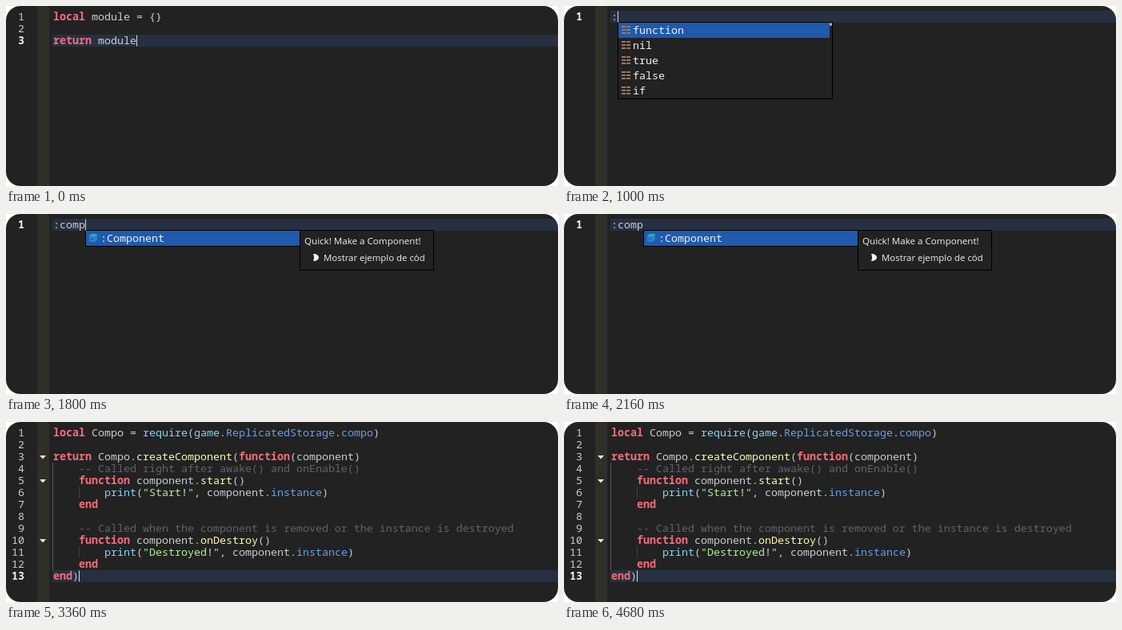
Animation of 690 by 226 pixels, one loop 4.76 s. Source, as an HTML page:

```html
<!DOCTYPE html>
<html lang="en">
<head>
<meta charset="utf-8">
<title>Code snippet</title>
<style>
  html, body { margin: 0; width: 100%; height: 100%; overflow: hidden; background: #fff; }
  svg { display: block; width: 690px; height: 226px; }
  text { white-space: pre; }
  .mono { font: 13.333px "Noto Sans Mono", "DejaVu Sans Mono", monospace; }
  .sans { font-family: "Open Sans", "Noto Sans", sans-serif; fill: #f2f2f2; }
  .bold { font-weight: 700; }
</style>
</head>
<body>
<svg id="stage" viewBox="0 0 690 226" xmlns="http://www.w3.org/2000/svg"></svg>
<script>
const LOOP = 4760, BLINK = 560, LEFT = 59, CHAR = 8, LINE = 15;
const NS = "http://www.w3.org/2000/svg";
const stage = document.getElementById("stage");

function add(parent, tag, attrs, content) {
  const node = document.createElementNS(NS, tag);
  for (const key in attrs) node.setAttribute(key, attrs[key]);
  if (content !== undefined) node.textContent = content;
  parent.appendChild(node);
  return node;
}
const rect = (g, x, y, width, height, fill, more) =>
  add(g, "rect", { x, y, width, height, fill, ...more });
const path = (g, d, fill) => add(g, "path", { d, fill });
const mono = (g, x, y, str, fill, bold) =>
  add(g, "text", { x, y, fill, class: bold ? "mono bold" : "mono" }, str);
const sans = (g, x, y, str, size, more) =>
  add(g, "text", { x, y, class: "sans", "font-size": size, ...more }, str);
const lineTop = n => 6 + (n - 1) * LINE;

// Syntax colours
const KEYWORDS = /^(local|return|function|end)$/;
const BUILTINS = /^(require|game|print)$/;
const TOKEN = /--.*|"[^"]*"|[A-Za-z_]\w*|[^\sA-Za-z"]/g;

function colourOf(word, before, after) {
  if (word.startsWith("--")) return "#636363";
  if (word[0] === '"') return "#adf195";
  if (KEYWORDS.test(word)) return "#f86d7c";
  if (BUILTINS.test(word)) return "#84d6f7";
  if (before === "." && /\w/.test(word)) return after === "(" ? "#fdfbac" : "#61a1f1";
  return "#c8cfd3";
}

function codeLine(g, n, str) {
  for (const match of str.matchAll(TOKEN)) {
    const word = match[0], at = match.index;
    const fill = colourOf(word, str[at - 1], str[at + word.length]);
    mono(g, LEFT + at * CHAR, lineTop(n) + 12, word, fill, KEYWORDS.test(word));
  }
}

function page(lines) {
  const g = add(board, "g", { display: "none" });
  const last = lines.length;
  rect(g, 58, lineTop(last), 632, LINE, "#273040");
  lines.forEach((str, i) => {
    const n = i + 1, current = n === last;
    mono(g, 23, lineTop(n) + 12, n, current ? "#ececec" : "#cccccc", current)
      .setAttribute("text-anchor", "end");
    codeLine(g, n, str);
  });
  return g;
}

// Item icons
function listIcon(g, x, y) {
  [0, 4, 8].forEach((dy, i) => {
    rect(g, x, y + dy, 5, 2, i === 1 ? "#a5714a" : "#8f8272");
    rect(g, x + 6, y + dy, 5, 2, i === 1 ? "#8f8272" : "#a5714a");
  });
}
function cubeIcon(g, x, y, selected) {
  path(g, `M${x} ${y + 3}l3-3h7v7l-3 3h-7z`, selected ? "#2487c4" : "#27b4df");
  path(g, `M${x} ${y + 3}l3-3h7l-3 3z`, selected ? "#3c9fce" : "#6bd3ee");
  path(g, `M${x + 2} ${y + 5}h3v3h-3z`, selected ? "#1c6fae" : "#157fa8");
}

function popup(g, x, items, icon, thumb) {
  const height = items.length * 19 + 2;
  rect(g, x + .5, 20.5, 268, height - 1, "#222222", { stroke: "#000" });
  rect(g, x + 1, 21, thumb ? 264 : 267, 19, "#205aac");
  items.forEach((label, i) => {
    icon(g, x + 5, 25 + i * 19, i === 0);
    mono(g, x + 19, 35 + i * 19, label, "#f0f0f0");
  });
  if (thumb) rect(g, x + 265, 21, 3, thumb, "#b4b4b4", { rx: 1.5 });
}

function colourPopup(g, x) {
  const doc = x + 268, inner = x + 274;
  rect(g, doc + .5, 20.5, 420, 76, "#222222", { stroke: "#000" });
  rect(g, doc, 48, 420, 1, "#000");
  mono(g, inner + 1, 38, "{ fromHSV: (number, number, number) -> Color3", "#e6e6e6");
  sans(g, inner, 67, "Un valor de color compuesto por componentes rojos, verdes y", 11.36);
  sans(g, inner, 87, "Abrir documentación", 11.68,
    { style: "fill:#4ab4ea", "text-decoration": "underline" });
  popup(g, x, ["Color3", "coroutine", "Content", "ColorSequence", "ColorSequenceKeypoint"],
    cubeIcon, 67);
}

function snippetPopup(g, x) {
  const doc = x + 268;
  rect(g, doc + .5, 20.5, 167, 50, "#222222", { stroke: "#000" });
  sans(g, doc + 6, 38, "Quick! Make a Component!", 11.6);
  path(g, `M${doc + 17} 50h2q5 1.5 5 4.5t-5 4.5h-2q2-4.500 0-9z`, "#f2f2f2");
  sans(g, doc + 30, 59, "Mostrar ejemplo de cód", 11.42);
  popup(g, x, [":Component"], cubeIcon);
}

const clip = add(stage, "clipPath", { id: "round" });
rect(clip, 0, 0, 690, 226, "#000", { rx: 18 });
const board = add(stage, "g", { "clip-path": "url(#round)" });
rect(board, 0, 0, 690, 226, "#222222");
rect(board, 39, 0, 15, 226, "#2f2f28");

function typed(str, show) {
  const g = page([str]);
  if (show) show(g, LEFT + str.length * CHAR);
  return g;
}

function component() {
  const g = page([
    "local Compo = require(game.ReplicatedStorage.compo)",
    "",
    "return Compo.createComponent(function(component)",
    "    -- Called right after awake() and onEnable()",
    "    function component.start()",
    '        print("Start!", component.instance)',
    "    end",
    "",
    "    -- Called when the component is removed or the instance is destroyed",
    "    function component.onDestroy()",
    '        print("Destroyed!", component.instance)',
    "    end",
    "end)"
  ]);
  rect(g, 58, lineTop(4), 1, 9 * LINE, "#555555");
  for (const n of [6, 11]) rect(g, 91, lineTop(n), 1, LINE, "#414141");
  for (const n of [3, 5, 10]) path(g, `M42 ${lineTop(n) + 6}h8l-4 4.500z`, "#e4e4e4");
  return g;
}

const keywords = (g, x) =>
  popup(g, x, ["function", "nil", "true", "false", "if"], listIcon, 4);

// Each step: start time, picture, caret column and line, start of the caret's blink
const steps = [
  [0, page(["local module = {}", "", "return module"]), 13, 3, 0],
  [320, typed(""), 0, 1, 320],
  [760, typed(":"), 1, 1, 760],
  [840, typed(":", keywords), 1, 1, 760],
  [1200, typed(":c", colourPopup), 2, 1, 1200],
  [1360, typed(":co", colourPopup), 3, 1, 1360],
  [1480, typed(":com", snippetPopup), 4, 1, 1480],
  [1595, typed(":comp", snippetPopup), 5, 1, 1595],
  [2275, component(), 4, 13, 2235]
];
const caret = rect(board, 0, 0, 1, 14, "#d8d8d8");

function draw(t) {
  const now = steps.filter(step => step[0] <= t).pop();
  for (const step of steps) step[1].setAttribute("display", step === now ? "inline" : "none");
  const [, , col, line, since] = now;
  caret.setAttribute("x", LEFT + col * CHAR);
  caret.setAttribute("y", lineTop(line) + .5);
  caret.setAttribute("display", Math.floor((t - since) / BLINK) % 2 ? "none" : "inline");
}

const start = performance.now();
function tick() {
  draw((performance.now() - start) % LOOP);
  requestAnimationFrame(tick);
}
tick();
</script>
</body>
</html>
```
